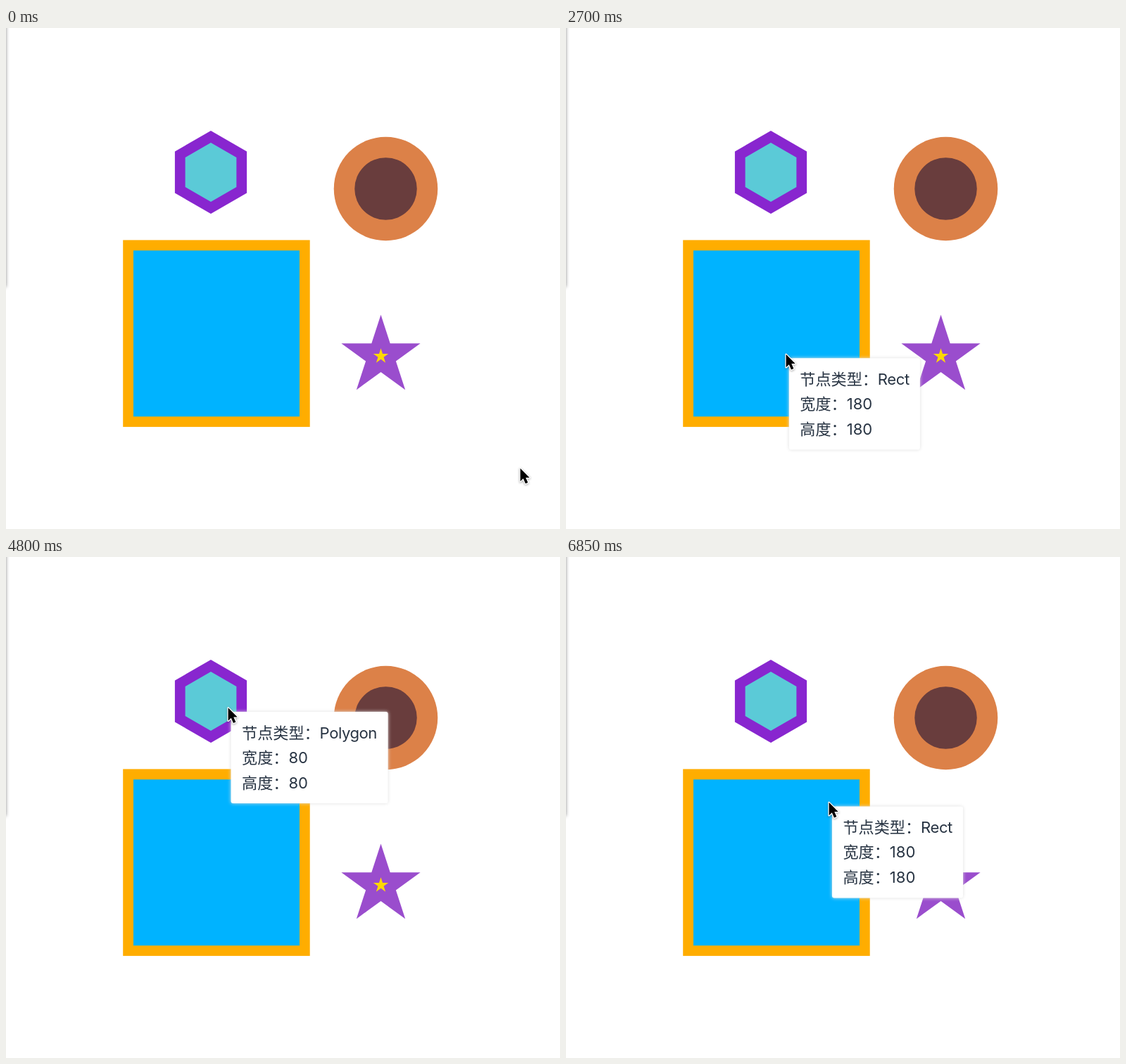
Write an HTML page that moves like this. It is 787 by 712 pixels and loops after 6990 ms.

```html
<!DOCTYPE html>
<html lang="zh-CN">
<head>
<meta charset="utf-8">
<title>节点提示</title>
<style>
  html, body { margin: 0; width: 100%; height: 100%; overflow: hidden; background: #fff; }
  body { position: relative; }
  svg { position: absolute; left: 0; top: 0; }
  #panel {
    position: absolute; left: -40px; top: -20px; width: 40px; height: 388px;
    box-shadow: 0 0 5px rgba(0, 0, 0, .45);
  }
  #tip {
    position: absolute; left: 0; top: 0; padding: 12.8px 15.5px 11.4px; border-radius: 3px;
    background: #fff; box-shadow: 0 0 5px #dedede; color: #283443; white-space: nowrap;
    font: 22.1px/35.4px Inter, "Noto Sans CJK SC", "Noto Sans CJK", sans-serif;
  }
  #kind { letter-spacing: -.45px; }
  #cursor { filter: drop-shadow(0 1.5px 1.5px rgba(0, 0, 0, .35)); }
</style>
</head>
<body>
<div id="panel"></div>
<svg width="787" height="712" viewBox="0 0 787 712">
  <polygon id="hexOuter" fill="#8826cf"/>
  <polygon id="hexInner" fill="#5bcad7"/>
  <circle cx="539.5" cy="228.5" r="73.75" fill="#dc8148"/>
  <circle cx="539.5" cy="228.5" r="44.25" fill="#693d3d"/>
  <rect x="166.2" y="301.4" width="265.5" height="265.5" fill="#ffad00"/>
  <rect x="181" y="316.2" width="236" height="236" fill="#00b3ff"/>
  <polygon id="starOuter" fill="#9a4dcd"/>
  <polygon id="starInner" fill="#ffd800"/>
</svg>
<div id="tip">
  <div>节点类型：<span id="kind"></span></div>
  <div>宽度：<span id="wide"></span></div>
  <div>高度：<span id="high"></span></div>
</div>
<svg width="787" height="712" viewBox="0 0 787 712">
  <g id="cursor">
    <path d="M.6 1.8V20.2L4.8 16.2 8 23.6 11.4 22.1 8.3 15H13.7Z" fill="#000"
      stroke="#fff" stroke-width="2.6" stroke-linejoin="round" paint-order="stroke"/>
  </g>
</svg>
<script>
const LOOP = 6990, LAST = 6850, STEP = 100;
const LAG = 20; // ms the tooltip trails the pointer
const $ = id => document.getElementById(id);

// Points around a centre, starting at the top; radii alternate.
function ring(cx, cy, n, ...radii) {
  return Array.from({ length: n }, (_, i) => {
    const a = i * 2 * Math.PI / n, r = radii[i % radii.length];
    return [cx + r * Math.sin(a), cy - r * Math.cos(a)];
  });
}
const setPoints = (id, points) => $(id).setAttribute('points', points.join(' '));

const hexagon = ring(291, 205, 6, 59);
const star = ring(532.5, 466.5, 10, 59, 22.5);
setPoints('hexOuter', hexagon);
setPoints('hexInner', ring(291, 205, 6, 42));
setPoints('starOuter', star);
setPoints('starInner', ring(532.5, 466.5, 10, 11.3, 4.3));

function inside(points, x, y) {
  let hit = false;
  points.forEach(([x1, y1], i) => {
    const [x2, y2] = points[(i + 1) % points.length];
    if ((y1 > y) !== (y2 > y) && x < x1 + (y - y1) * (x2 - x1) / (y2 - y1)) hit = !hit;
  });
  return hit;
}

const nodes = [
  { kind: 'Star', size: 80, hit: (x, y) => inside(star, x, y) },
  { kind: 'Rect', size: 180, hit: (x, y) => x >= 166 && x <= 432 && y >= 301 && y <= 567 },
  { kind: 'Polygon', size: 80, hit: (x, y) => inside(hexagon, x, y) },
  { kind: 'Ellipse', size: 100, hit: (x, y) => Math.hypot(x - 539.5, y - 228.5) <= 73.75 }
];

// Places where the pointer slows down or turns; it eases from one to the next.
const stops = [
  { t: 0, x: 730, y: 624 },
  { t: 700, x: 249, y: 180 },
  { t: 1100, x: 539, y: 200 },
  { t: 1400, x: 550, y: 463.5 },
  { t: 1800, x: 515, y: 193 },
  { t: 2400, x: 257, y: 340 },
  { t: 2700, x: 312, y: 462 },
  { t: 3000, x: 358, y: 450 },
  { t: 3500, x: 295, y: 425 },
  { t: 4200, x: 300, y: 235 },
  { t: 4500, x: 168, y: 175 },
  { t: 4800, x: 315, y: 212.5 },
  { t: 5600, x: 542, y: 217 },
  { t: 6200, x: 450, y: 298 },
  { t: LAST, x: 373, y: 347 }
];

const ease = k => k * k * k * (10 - 15 * k + 6 * k * k);

function pointer(t) {
  const i = Math.max(1, stops.findIndex(s => s.t >= t));
  const a = stops[i - 1], b = stops[i];
  const k = ease(Math.max(0, (t - a.t) / (b.t - a.t)));
  return [a.x + (b.x - a.x) * k, a.y + (b.y - a.y) * k];
}

// The screen refreshes in steps, with a longer hold before the last one.
const hold = t => t >= LAST ? LAST : Math.min(6700, Math.floor(t / STEP) * STEP);

function draw(time) {
  const t = hold(time % LOOP);
  const [x, y] = pointer(t);
  $('cursor').setAttribute('transform', `translate(${x} ${y})`);

  const node = nodes.find(n => n.hit(x, y));
  $('tip').style.visibility = node ? 'visible' : 'hidden';
  if (!node) return;
  $('kind').textContent = node.kind;
  $('wide').textContent = $('high').textContent = node.size;
  const [tx, ty] = pointer(t - LAG);
  $('tip').style.transform = `translate(${tx + 5}px, ${ty + 7.5}px)`;
}

const start = performance.now();
function tick() {
  draw(performance.now() - start);
  requestAnimationFrame(tick);
}
tick();
</script>
</body>
</html>
```
